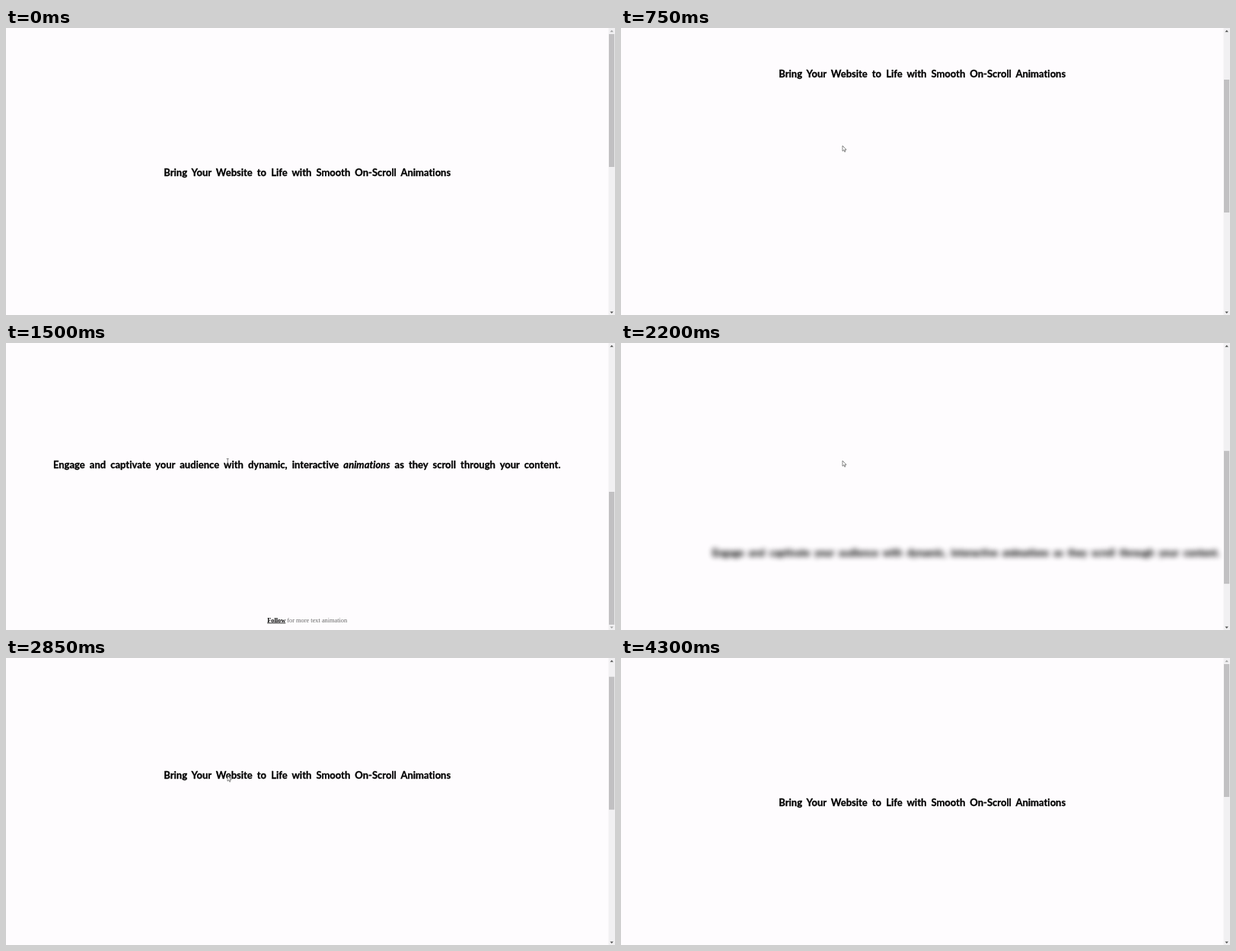
An HTML page that plays this animation: 800 by 378 pixels, repeating every 4350 ms.

```html
<!DOCTYPE html>
<html lang="en">
<head>
<meta charset="utf-8">
<title>On-scroll text animation</title>
<style>
html, body { margin: 0; width: 100%; height: 100%; overflow: hidden; background: #fefcfe; }
svg { display: block; width: 800px; height: 378px; }
.title {
  font: 700 13px "Comic Sans MS", Lato, sans-serif;
  font-variant-ligatures: none; word-spacing: 2.9px; text-anchor: middle;
  stroke: #000; stroke-width: .3; stroke-linejoin: round;
}
.foot { font: 8.33px "Liberation Serif", serif; fill: #666; text-anchor: middle; }
.link { font-weight: 700; fill: #000; text-decoration: underline; }
</style>
</head>
<body>
<svg viewBox="0 0 800 378">
  <rect width="800" height="378" fill="#fefcfe"/>
  <g id="page">
    <text class="title" x="395.7" y="194.7">Bring Your Website to Life with Smooth On-Scroll Animations</text>
    <text id="lead" class="title" x="395.2" y="570">Engage and captivate your audience with dynamic, interactive <tspan font-style="italic">animations</tspan> as they scroll through your content.</text>
    <text class="foot" x="395.7" y="772.5"><tspan class="link">Follow</tspan> for more text animation</text>
  </g>
  <path id="arrow" d="M0 0V7.2L1.7 5.7L2.8 8.2L3.9 7.7L2.8 5.3H5Z" fill="#fff" stroke="#555" stroke-width=".7"/>
  <path id="beam" d="M289.7 152.5H292.7M291.2 152.5V159.5M289.7 159.5H292.7" fill="none" stroke="#555" stroke-width=".7"/>
  <rect x="791.5" width="8.5" height="378" fill="#f1f0f2"/>
  <rect id="thumb" x="792" width="7.2" height="175" fill="#c1c0c2"/>
  <path id="up" d="M793.5 5.2L795.7 2.8L797.9 5.2Z"/>
  <path id="down" d="M793.5 373.6L795.7 376L797.9 373.6Z"/>
</svg>
<script>
const LOOP = 4350, STEP = 50, MAX = 405;
const [page, lead, arrow, beam, thumb, up, down] =
  ["page", "lead", "arrow", "beam", "thumb", "up", "down"].map(id => document.getElementById(id));

const progress = (t, from, to) => Math.min(1, Math.max(0, (t - from) / (to - from)));

// way back up: time (ms), scroll offset (px)
const back = [[1700, MAX], [2200, 289], [2550, 151.5], [2850, 36], [3300, 0]];

function slope(i) {
  const a = back[i - 1], b = back[i + 1];
  return a && b ? (b[1] - a[1]) / (b[0] - a[0]) : 0;
}

// smooth curve through the points
function scrollBack(t) {
  const i = back.findIndex(k => k[0] > t) - 1;
  if (i < 0) return 0;
  const [t0, s0] = back[i], [t1, s1] = back[i + 1];
  const d = t1 - t0, u = (t - t0) / d, v = 1 - u;
  return s0 * v * v * (1 + 2 * u) + s1 * u * u * (3 - 2 * u)
    + d * u * v * (slope(i) * v - slope(i + 1) * u);
}

const scrollAt = t =>
  t < back[0][0] ? MAX * progress(t, 50, 1200) ** 2.3 : scrollBack(t);

// CSS "ease": cubic-bezier(.25, .1, .25, 1)
function ease(p) {
  if (p <= 0 || p >= 1) return p <= 0 ? 0 : 1;
  const curve = (u, a, b) => 3 * u * (1 - u) * ((1 - u) * a + u * b) + u * u * u;
  let lo = 0, hi = 1;
  for (let i = 0; i < 24; i++) {
    const mid = (lo + hi) / 2;
    if (curve(mid, .25, .25) < p) lo = mid; else hi = mid;
  }
  return curve(lo, .1, 1);
}

// the reveal follows the scroll offset
function drawLead(s) {
  const rest = 1 - ease(progress(s, 179, 343));
  lead.style.transform = `translateX(${790 * rest}px)`;
  lead.style.filter = rest > .002 ? `blur(${48 * rest}px)` : "none";
  lead.style.opacity = 1 - rest;
}

function drawCursor(t) {
  const overText = t >= 1350 && t < 1750;
  const leave = progress(t, 3350, 3900) ** 1.5;
  beam.style.display = overText ? "" : "none";
  arrow.style.display = !overText && t >= 50 && t < 3900 ? "" : "none";
  arrow.setAttribute("transform", `translate(${291 - 185 * leave} ${155 - 163 * leave})`);
}

function draw(t) {
  const s = scrollAt(t);
  page.setAttribute("transform", `translate(0 ${-s})`);
  drawLead(s);
  drawCursor(t);
  thumb.setAttribute("y", 8 + s * 188 / MAX);
  up.setAttribute("fill", s > 0 ? "#505050" : "#a3a3a3");
  down.setAttribute("fill", s < MAX ? "#505050" : "#a3a3a3");
}

const start = performance.now();
function tick() {
  const t = (performance.now() - start) % LOOP;
  draw(Math.floor(t / STEP) * STEP);
  requestAnimationFrame(tick);
}
tick();
</script>
</body>
</html>
```
